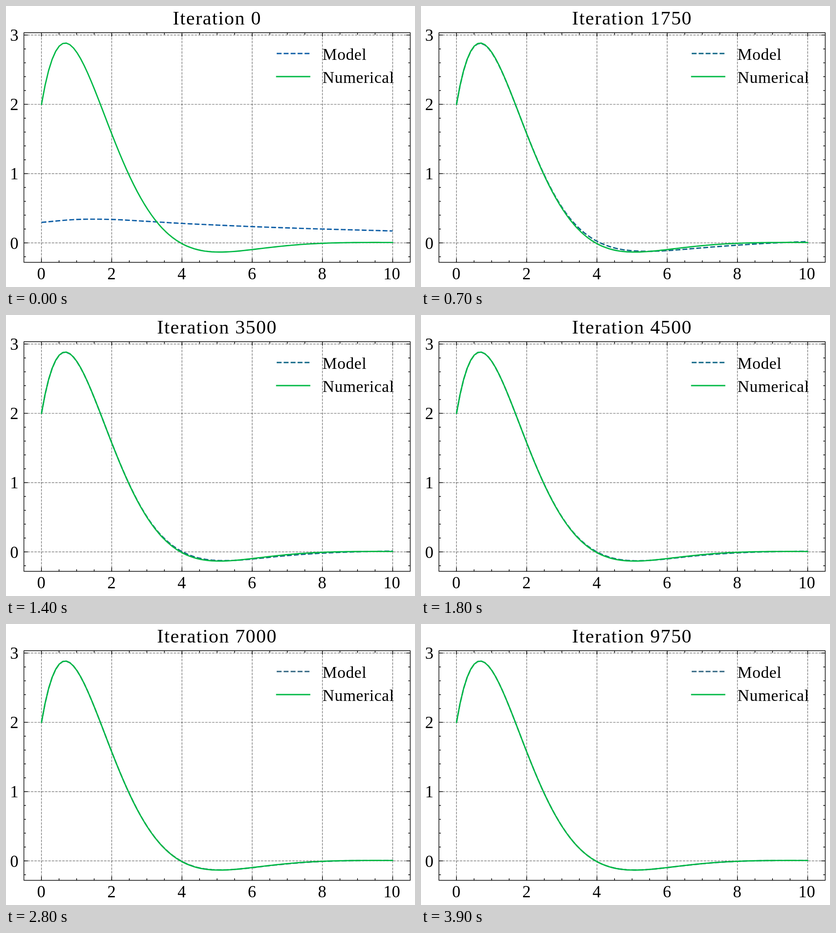
An HTML page with a canvas for the animation above (4000 ms loop, 902x621 px).

```html
<!DOCTYPE html>
<html>
<head>
<meta charset="utf-8">
<title>Model fit</title>
<style>
html, body { margin: 0; width: 100%; height: 100%; overflow: hidden; background: #fff; }
canvas { display: block; }
</style>
</head>
<body>
<canvas id="plot" width="902" height="621"></canvas>
<script>
const ctx = document.getElementById('plot').getContext('2d');
const LEFT = 39.5, RIGHT = 891.5, TOP = 59, BOTTOM = 566.5;
const LINE = 2.9, THIN = 1.45;
const FONT = '"Liberation Serif", "Times New Roman", serif';
const GREEN = '#00b945';
const DASH = [3.7, 1.6];

const px = x => 78.3 + 77.44 * x;
const py = y => 523.5 - 153.07 * y;

// Damped oscillator u'' + 1.4u' + u = 0 with u(0) = 2, u'(0) = 3
const damping = 0.7, omega = Math.sqrt(1 - damping ** 2);
const numerical = x => Math.exp(-damping * x) *
  (2 * Math.cos(omega * x) + (3 + 2 * damping) / omega * Math.sin(omega * x));

// Smooth curve through values given at x = 0, 1, ..., 10
function spline(v) {
  return x => {
    const i = Math.min(Math.floor(x), v.length - 2), t = x - i;
    const b = v[i], c = v[i + 1];
    const a = v[i - 1] ?? 2 * b - c, d = v[i + 2] ?? 2 * c - b;
    return b + t / 2 * (c - a + t * (2 * a - 5 * b + 4 * c - d + t * (3 * (b - c) + d - a)));
  };
}
const untrained = spline([.296, .338, .338, .311, .281, .257, .235, .2165, .2, .186, .172]);
const residual = spline([0, -.008, .004, .022, .057, .03, -.025, -.05, -.043, -.012, .022]);

function model(x, iteration) {
  const exact = numerical(x);
  const start = [1, 0.28, 0.06][iteration / 250] ?? 0;
  const rest = Math.exp((750 - iteration) / 2150) * (1 - start);
  return exact + start * (untrained(x) - exact) + rest * residual(x);
}

function stroke(points, color, width, dashed, cap = 'butt') {
  ctx.strokeStyle = color;
  ctx.lineWidth = width;
  ctx.lineCap = cap;
  ctx.lineJoin = 'round';
  ctx.setLineDash(dashed ? DASH.map(d => d * width) : []);
  ctx.beginPath();
  points.forEach(([x, y]) => ctx.lineTo(x, y));
  ctx.stroke();
}

const curve = f => Array.from({ length: 100 }, (_, i) => {
  const x = i / 9.9;
  return [px(x), py(f(x))];
});

function text(label, x, y, size, align, spacing = 0) {
  ctx.font = `${size}px ${FONT}`;
  ctx.letterSpacing = spacing + 'px';
  ctx.textAlign = align;
  ctx.fillStyle = '#000';
  ctx.fillText(label, x, y);
}

function tick(x, y, dx, dy) {
  stroke([[x, y], [x + dx, y + dy]], '#000', THIN);
}

function drawGrid() {
  const gray = 'rgba(0,0,0,.5)';
  for (let x = 0; x <= 10; x += 2) stroke([[px(x), BOTTOM], [px(x), TOP]], gray, THIN, true);
  for (let y = 0; y <= 3; y++) stroke([[LEFT, py(y)], [RIGHT, py(y)]], gray, THIN, true);
}

function drawAxes() {
  for (let i = 0; i <= 20; i++) {
    const x = px(i / 2), size = i % 4 ? 4.4 : 8.7;
    tick(x, BOTTOM, 0, -size);
    tick(x, TOP, 0, size);
    if (i % 4 === 0) text(i / 2, i === 20 ? x - 2 : x - 0.5, 604, 37, 'center');
  }
  for (let i = -1; i <= 15; i++) {
    const y = py(i / 5), size = i % 5 ? 4.4 : 8.7;
    tick(LEFT, y, size, 0);
    tick(RIGHT, y, -size, 0);
    if (i % 5 === 0) text(i / 5, 27.5, y + 13, 37, 'right');
  }
  ctx.strokeStyle = '#000';
  ctx.strokeRect(LEFT, TOP, RIGHT - LEFT, BOTTOM - TOP);
}

function drawLegend(color) {
  stroke([[597, 105], [669.7, 105]], color, LINE, true);
  stroke([[597, 156], [669.7, 156]], GREEN, LINE, false, 'square');
  text('Model', 698, 119, 36, 'left', 0.7);
  text('Numerical', 698, 170, 36, 'left', 0.7);
}

function draw(now) {
  const iteration = Math.floor(now % 4000 / 100) * 250;
  const blue = iteration < 1500 ? '#0c5da5' : iteration < 5500 ? '#0b6484' : '#2f6480';
  ctx.fillStyle = '#fff';
  ctx.fillRect(0, 0, 902, 621);
  drawGrid();
  stroke(curve(x => model(x, iteration)), blue, LINE, true);
  stroke(curve(numerical), GREEN, LINE, false, 'square');
  drawAxes();
  drawLegend(blue);
  text('Iteration ' + iteration, 465.5, 41, 43, 'center', 1.6);
  requestAnimationFrame(draw);
}
requestAnimationFrame(draw);
</script>
</body>
</html>
```
